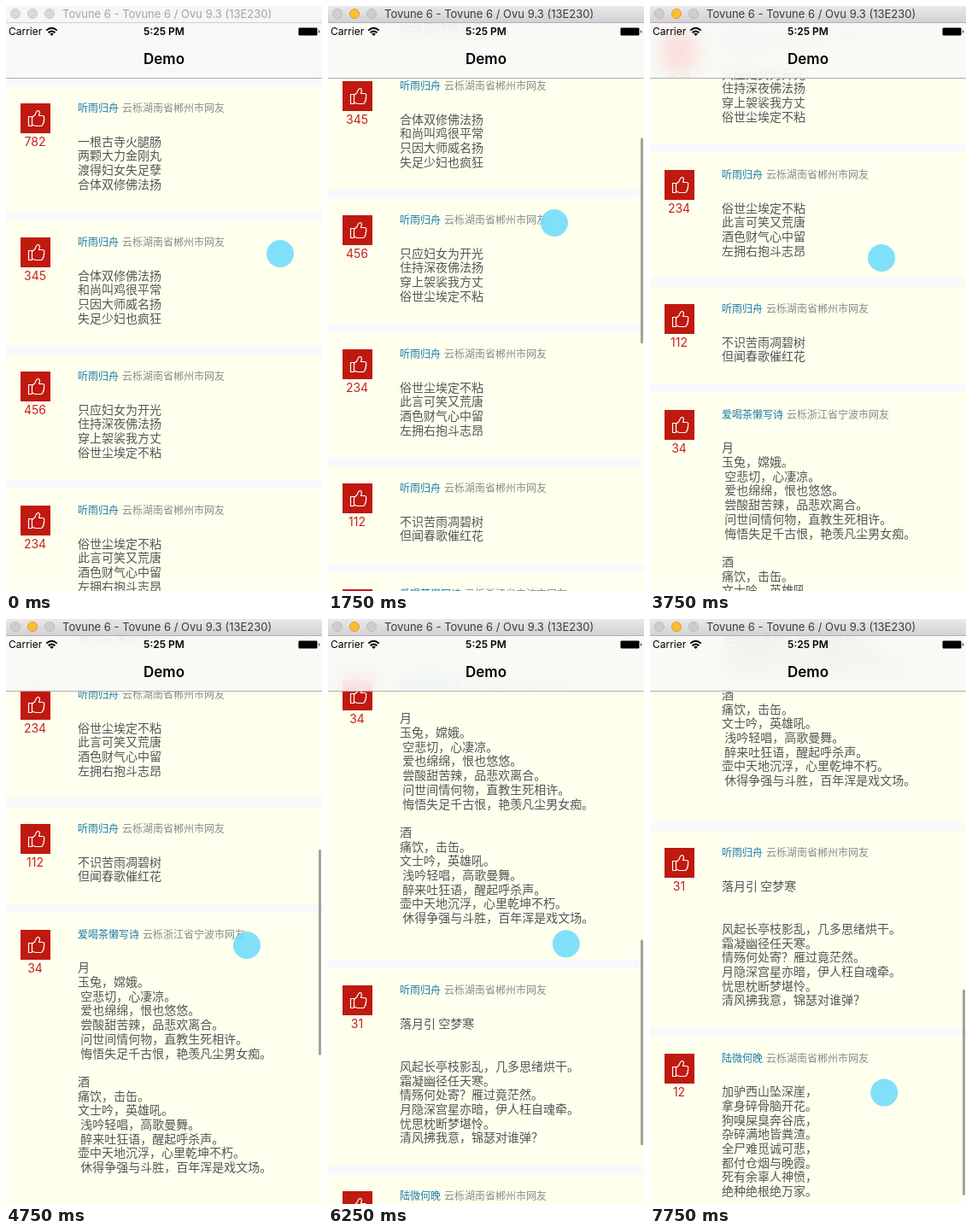
Write an HTML page that moves like this. It is 370 px wide and 685 px high and loops after 8 s.

```html
<!DOCTYPE html>
<html lang="zh-CN">
<head>
<meta charset="utf-8">
<style>
html, body { margin: 0; width: 100%; height: 100%; overflow: hidden; background: #f9f9fb; }
body { position: relative; font-family: Inter, sans-serif; }
div, svg, b, i, p { position: absolute; top: 0; margin: 0; white-space: pre; font-style: normal; }
#list { left: 0; width: 370px; }
.card { left: 0; width: 370px; background: #ffffee; font-family: "Noto Sans CJK SC", sans-serif; }
.card svg { left: 17px; top: 20px; background: #c0190f; }
.card b { left: 0; width: 68px; top: 57px; text-align: center; font: 14px/16px Inter, sans-serif; color: #c8201c; }
.card i { left: 84px; top: 17px; font-size: 12px; line-height: 16px; color: #8b8b89; }
.card em { font-style: normal; font-weight: 500; color: #1a7ba6; margin-right: 4px; }
.card p { left: 84px; top: 55.7px; font-size: 14px; line-height: 16.7px; color: #555; }
#nav { left: 0; top: 20px; width: 370px; height: 64px; border-bottom: 1px solid #b0b0ae;
  background: rgba(248, 248, 248, .85); backdrop-filter: blur(12px) saturate(1.6); color: #000; }
#nav div { line-height: 20px; font-size: 12px; }
#nav .mid { left: 0; width: 370px; text-align: center; font-weight: 600; }
#window { left: 0; width: 370px; height: 19px; border-bottom: 1px solid #d0d0d0; background: #f6f6f6; color: #a4a4a4; }
#window div { left: 66px; font-size: 13px; line-height: 18px; }
#window i { top: 3px; width: 10px; height: 10px; border: 1px solid #cacaca; border-radius: 50%; background: #d8d8d8; }
#window.active { background: linear-gradient(#eae8ea, #d3d1d3); border-color: #b2b0b2; color: #3c3c3c; }
#window.active i { background: #cfcdcf; border-color: #bcbabc; }
#window.active .yellow { background: #fdbd30; border-color: #e0a028; }
#bar { left: 366px; top: 88px; width: 3px; height: 241px; border-radius: 2px; background: rgba(0, 0, 0, .36); }
#touch { left: -16px; top: -16px; width: 32px; height: 32px; border-radius: 50%; background: rgba(112, 220, 251, .88); }
#touch.pressed { left: -21px; top: -21px; width: 36px; height: 36px; background: none; border: 3px solid rgba(150, 228, 242, .65); }
</style>
</head>
<body>
<div id="list"></div>
<div id="nav">
  <div style="left:3px">Carrier</div>
  <svg style="left:46px;top:4px" width="15" height="12" fill="none" stroke="#000" stroke-width="1.9">
    <path d="M1.2 4.6Q7.5 -1 13.8 4.6M3.6 7.2Q7.5 3.6 11.4 7.2"/><path d="M7.5 11L5.2 8.8Q7.5 6.8 9.8 8.8Z" fill="#000" stroke="none"/>
  </svg>
  <div class="mid">5:25 PM</div>
  <svg style="left:342px;top:5px" width="26" height="10">
    <rect x=".5" y=".5" width="22" height="9" rx="1.5" fill="none" stroke="#777"/><path d="M1 1h21v8H1zM24 3q2 2 0 4z"/>
  </svg>
  <div class="mid" style="top:32px;font-size:17px">Demo</div>
</div>
<div id="window">
  <i style="left:5px"></i><i class="yellow" style="left:25px"></i><i style="left:45px"></i>
  <div>Tovune 6 - Tovune 6 / Ovu 9.3 (13E230)</div>
</div>
<div id="bar"></div>
<div id="touch"></div>
<script>
const LINE = 16.7, STEP = .25, LOOP = 8, GLIDE_TIME = .4;
const poet = '听雨归舟', hunan = '云栎湖南省郴州市网友';
const posts = [
  [782, poet, hunan, '一根古寺火腿肠\n两颗大力金刚丸\n渡得妇女失足孽\n合体双修佛法扬'],
  [345, poet, hunan, '合体双修佛法扬\n和尚叫鸡很平常\n只因大师威名扬\n失足少妇也疯狂'],
  [456, poet, hunan, '只应妇女为开光\n住持深夜佛法扬\n穿上袈裟我方丈\n俗世尘埃定不粘'],
  [234, poet, hunan, '俗世尘埃定不粘\n此言可笑又荒唐\n酒色财气心中留\n左拥右抱斗志昂'],
  [112, poet, hunan, '不识苦雨凋碧树\n但闻春歌催红花'],
  [34, '爱喝茶懒写诗', '云栎浙江省宁波市网友',
    '月\n玉兔，嫦娥。\n 空悲切，心凄凉。\n 爱也绵绵，恨也悠悠。\n 尝酸甜苦辣，品悲欢离合。\n' +
    ' 问世间情何物，直教生死相许。\n 悔悟失足千古恨，艳羡凡尘男女痴。\n\n酒\n痛饮，击缶。\n文士吟，英雄吼。\n' +
    ' 浅吟轻唱，高歌曼舞。\n 醉来吐狂语，醒起呼杀声。\n壶中天地沉浮，心里乾坤不朽。\n 休得争强与斗胜，百年浑是戏文场。\n '],
  [31, poet, hunan, '落月引 空梦寒\n\n\n风起长亭枝影乱，几多思绪烘干。\n霜凝幽径任天寒。\n' +
    '情殇何处寄？雁过竟茫然。\n月隐深宫星亦暗，伊人枉自魂牵。\n忧思枕断梦堪怜。\n清风拂我意，锦瑟对谁弹？'],
  [12, '陆微何晚', hunan, '加驴西山坠深崖，\n拿身碎骨脑开花。\n狗嗅屎臭奔谷底，\n杂碎满地皆粪渣。\n' +
    '全尸难觅诚可悲，\n都付仓烟与晚霞。\n死有余辜人神愤，\n绝种绝根绝万家。']
];
const thumb = `<svg width="35" height="35" fill="none" stroke="#fff" stroke-width="1.2" stroke-linejoin="round">
  <path d="M9.5 15.5h4v11h-4zM13.5 16.5L17 13.5Q18.5 8.5 21 8.5Q23.5 9 21.5 14.5H26Q28.5 15 27.5 17.5Q28.5 19 27 20.5Q28 22.5 26.2 23.7Q26.5 26 24 26.5H17.5L13.5 25"/></svg>`;

const $ = id => document.getElementById(id);
let cardTop = 94;
$('list').innerHTML = posts.map(([likes, name, from, text]) => {
  const height = 80.2 + LINE * text.split('\n').length;
  const card = `<div class="card" style="top:${cardTop}px;height:${height}px">${thumb}<b>${likes}</b><i><em>${name}</em>${from}</i><p>${text}</p></div>`;
  cardTop += height + 10;
  return card;
}).join('');

// Pointer path; a point with a glide ends a drag and lets the list coast that far.
const path = [
  { t: 0, x: 321, y: 290 }, { t: .75, x: 300, y: 374 }, { t: 1.25, x: 270, y: 254, glide: 88 },
  { t: 1.75, x: 265, y: 254 }, { t: 2.5, x: 262, y: 533 }, { t: 3.05, x: 260, y: 350, glide: 3 },
  { t: 3.75, x: 271, y: 295 }, { t: 4.25, x: 276, y: 470 }, { t: 4.65, x: 282, y: 375, glide: 58 },
  { t: 5.55, x: 281, y: 578 }, { t: 6.15, x: 279, y: 377, glide: 211 },
  { t: 6.75, x: 276, y: 422 }, { t: LOOP, x: 274, y: 570 }
];
const mix = (a, b, p) => a + (b - a) * p;

function pose(t) {
  let scroll = 0, coasting = 0, x, y, pressed;
  for (let n = 1; n < path.length && path[n - 1].t <= t; n++) {
    const a = path[n - 1], b = path[n], dragging = b.glide > 0;
    const p = Math.min(1, (t - a.t) / (b.t - a.t));
    const eased = dragging ? p : p * p * (3 - 2 * p);
    x = mix(a.x, b.x, eased);
    y = mix(a.y, b.y, eased);
    pressed = dragging && p < 1;
    if (!dragging) continue;
    const rest = b.glide * Math.exp(-Math.max(0, t - b.t) / GLIDE_TIME);
    scroll += a.y - y + b.glide - rest;
    if (!pressed) coasting += rest;
  }
  return { scroll, x, y, pressed, moving: pressed || coasting > 1 };
}

function draw() {
  const t = Math.floor(performance.now() / 1000 % LOOP / STEP) * STEP;
  const { scroll, x, y, pressed, moving } = pose(t);
  $('list').style.transform = `translateY(${-Math.round(scroll)}px)`;
  $('bar').style.transform = `translateY(${scroll * .362}px)`;
  $('bar').style.visibility = moving ? 'visible' : 'hidden';
  $('touch').style.transform = `translate(${x}px,${y}px)`;
  $('touch').className = pressed ? 'pressed' : '';
  $('window').className = t >= path[1].t ? 'active' : '';
  requestAnimationFrame(draw);
}
draw();
</script>
</body>
</html>
```
